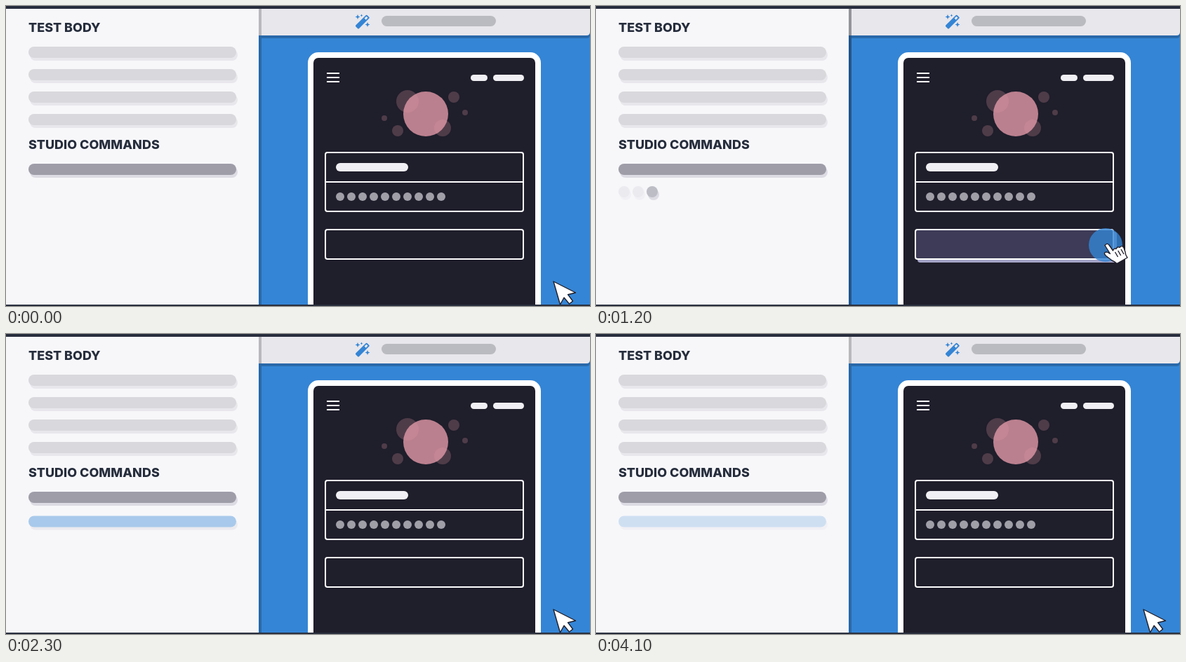
Animation of 832 by 428 pixels, one loop 4.3 s. Source, as an HTML page:

```html
<!DOCTYPE html>
<html lang="en">
<head>
<meta charset="utf-8">
<title>Studio commands</title>
<style>
html, body { margin: 0; width: 100%; height: 100%; overflow: hidden; }
svg { display: block; width: 832px; height: 428px; }
text { font: 800 18px Inter, sans-serif; fill: #262d3c; }
.outline { fill: none; stroke: #fff; stroke-width: 2; }
.cursor { fill: #fff; stroke: #1f1e2b; stroke-width: 1.4; stroke-linejoin: round; }
</style>
</head>
<body>
<svg viewBox="0 0 832 428">
  <rect width="832" height="428" fill="#3485d5"/>
  <rect width="360" height="428" fill="#f7f7fa"/>

  <text x="32" y="37">TEST BODY</text>
  <text x="32" y="204">STUDIO COMMANDS</text>
  <g id="bars"></g>
  <g id="loader"></g>

  <path d="M364 4H832V41Q832 46 827 46H364Z" fill="#2969aa"/>
  <path d="M364 4H832V37Q832 42 827 42H364Z" fill="#e8e7ec"/>
  <rect x="360" y="4" width="4" height="38" fill="#b9b9bd"/>
  <rect x="360" y="42" width="4" height="384" fill="#2868a8"/>
  <rect id="edgeShade" x="360" y="4" width="4" height="422" fill="#101020" opacity=".22"/>

  <g fill="#3485d5">
    <g transform="rotate(-45 508 22)">
      <rect x="496" y="19" width="23" height="6.5" rx="1.5"/>
      <rect x="513" y="20.7" width="4" height="3" fill="#e8e7ec"/>
    </g>
    <path d="M501 12l1 2.5 2.500 1-2.500 1-1 2.500-1-2.500-2.500-1 2.500-1z
             M506.500 11.500l.6 1.400 1.400.6-1.400.6-.6 1.400-.6-1.400-1.400-.6 1.400-.6z
             M515 23l1 2.500 2.500 1-2.500 1-1 2.500-1-2.500-2.500-1 2.500-1z"/>
  </g>
  <rect x="535" y="14" width="163" height="15" rx="7.5" fill="#babbc0"/>

  <rect x="430" y="66" width="332" height="400" rx="15" fill="#fff"/>
  <rect x="438" y="74" width="316" height="400" rx="7" fill="#1f1e2b"/>
  <path class="outline" d="M457 96H475M457 102H475M457 108H475"/>
  <g fill="#f0f0f4">
    <rect x="662" y="98" width="24" height="9" rx="4.5"/>
    <rect x="694" y="98" width="44" height="9" rx="4.5"/>
    <rect x="470" y="224" width="103" height="12" rx="6"/>
  </g>
  <circle cx="598" cy="154" r="32" fill="#bb808f"/>
  <g id="bubbles" fill="#de97a5" fill-opacity=".25"></g>
  <rect class="outline" x="455" y="209" width="282" height="84" rx="3"/>
  <path class="outline" d="M455 251H737"/>
  <g id="password" fill="#a09fa8"></g>

  <g id="pressed">
    <rect x="458" y="322" width="284" height="44" rx="4" fill="#a4a3c6"/>
    <rect x="455" y="319" width="282" height="42" rx="3" fill="#3d3b57"/>
  </g>
  <rect class="outline" x="455" y="319" width="282" height="42" rx="3"/>
  <circle id="ripple" cx="726" cy="341" r="24" fill="#3485d5"/>

  <path id="arrow" class="cursor" d="M0 0L31.500 16 20.500 18.700 27.500 28 22.500 32 15 23 9.500 33Z"/>
  <g id="hand" class="cursor">
    <path d="M725 341.500Q728 337.500 731 341L736.500 349Q738 345 741 346.500 743 342.500 746 344.500
             749 340.500 752 345L754 351Q754 355 757 359L742 367.500Q739 364.500 735 363
             L726 356Q722 351 728 351L732.500 353.500Z"/>
    <path d="M739.500 351l4 7M743.700 349l4 7M748 347l4 7"/>
  </g>

  <rect width="832" height="4" fill="#282d3d"/>
  <rect y="426" width="832" height="2" fill="#2a2f3d"/>
</svg>
<script>
const $ = id => document.getElementById(id);
const clamp = (v, lo, hi) => Math.min(hi, Math.max(lo, v));
const show = (el, opacity) => el.setAttribute('opacity', opacity);

function add(parent, tag, attrs) {
  const el = document.createElementNS('http://www.w3.org/2000/svg', tag);
  for (const key in attrs) el.setAttribute(key, attrs[key]);
  return parent.appendChild(el);
}

// Rounded shape with a hard shadow down and to the right
function pill(parent, x, y, width, fill, shadow) {
  const group = add(parent, 'g', {});
  const shape = { width, height: 16, rx: 8 };
  add(group, 'rect', { ...shape, x: x + 2, y: y + 4, fill: shadow });
  add(group, 'rect', { ...shape, x, y, fill });
  return group;
}

for (const y of [58, 90, 122, 154]) pill($('bars'), 32, y, 296, '#d9d8dc', '#e8e7ec');
pill($('bars'), 32, 225, 296, '#9e9da8', '#dddbe3');
const newBar = pill($('bars'), 32, 259.5, 296, '#3485d5', '#dad9e0');
const dots = [32, 52, 72].map(x => pill($('loader'), x, 257, 16, '#bdbdc6', '#dddbe3'));

for (const [cx, cy, r] of [[572, 136, 16], [622, 174, 12], [638, 130, 8],
                           [654, 152, 4], [558, 178, 8], [539, 160, 4]])
  add($('bubbles'), 'circle', { cx, cy, r });
for (let i = 0; i < 10; i++)
  add($('password'), 'circle', { cx: 476 + 16 * i, cy: 272, r: 6 });

function draw(t) {
  const clicking = t >= 700 && t < 1300;
  const active = Math.floor((t - 700) / 200) % 3;
  const offset = t < 700 ? Math.min(55, t * 0.0975)
                         : clamp((1500 - t) / 300, 0, 1) * 55;

  $('arrow').setAttribute('transform', `translate(${780 - offset} ${393 - offset})`);
  show($('arrow'), clicking ? 0 : 1);
  for (const id of ['hand', 'pressed', 'edgeShade'])
    $(id).style.display = clicking ? '' : 'none';

  show($('ripple'), clamp(1 - Math.abs(t - 1100) / 500, 0, 1));
  show($('loader'), t < 700 ? 0 : clamp((1900 - t) / 600, 0, 1));
  dots.forEach((dot, i) => show(dot, i === active ? 1 : 0.2));
  show(newBar, clamp(Math.min(t - 1900, 4300 - t) / 1000, 0, 0.8));
}

// Motion runs in 100 ms steps, then 200 ms steps from 1.7 s on
function tick() {
  const t = performance.now() % 4300;
  const step = t < 1700 ? 100 : 200;
  draw(1700 + Math.floor((t - 1700) / step) * step);
  requestAnimationFrame(tick);
}
tick();
</script>
</body>
</html>
```
